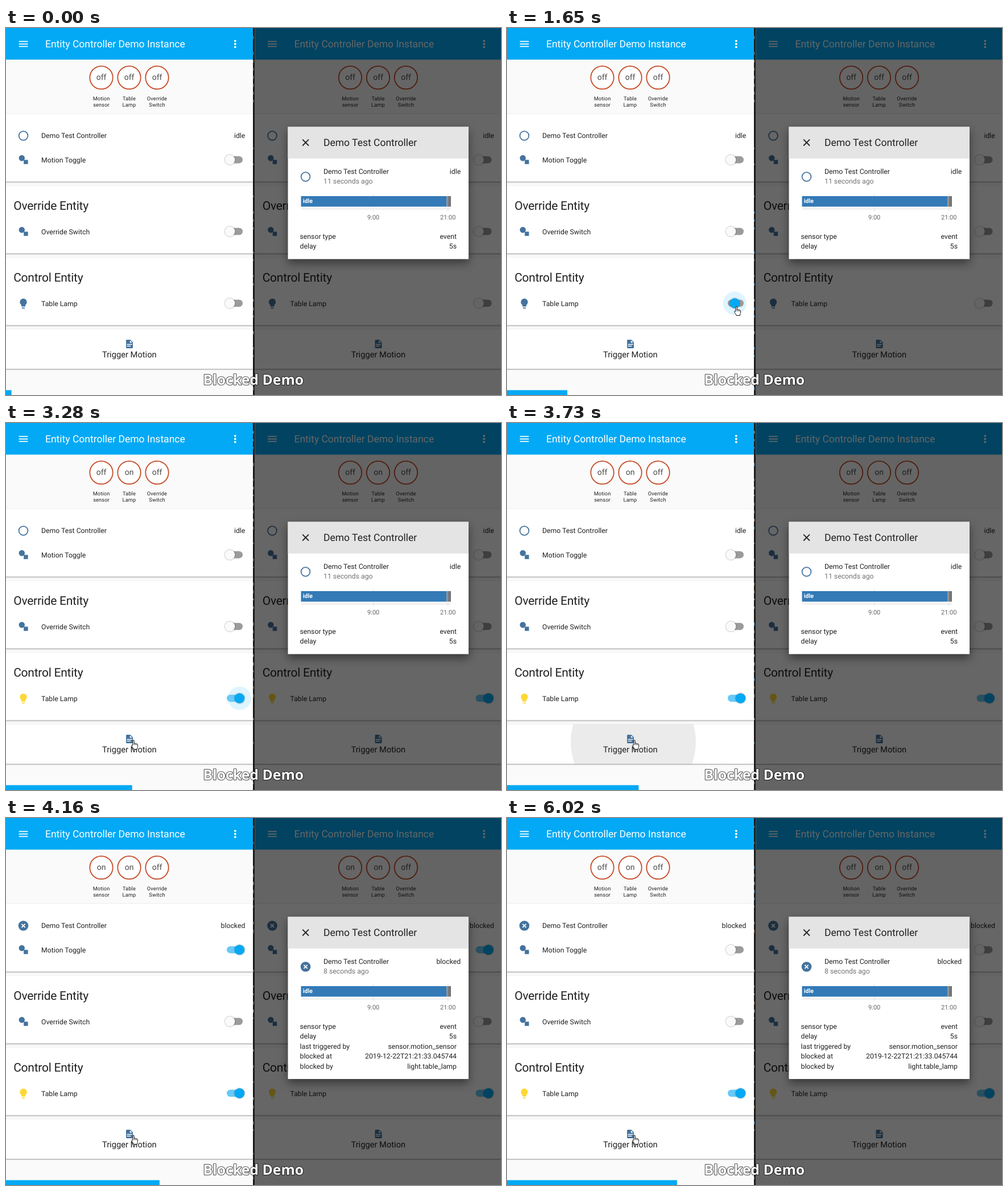
Recreate the animation shown at these times as an HTML page. Size 870 px wide and 644 px high, loop 8000 ms.

```html
<!DOCTYPE html>
<html lang="en">
<head>
<meta charset="utf-8">
<title>Blocked Demo</title>
<style>
  html, body { margin: 0; width: 100%; height: 100%; overflow: hidden; background: #fafafa; }
  svg { display: block; width: 870px; height: 644px; }
  text { font-family: Roboto, sans-serif; text-rendering: geometricPrecision; }
  .card { filter: drop-shadow(0 1.4px 1.1px rgba(0, 0, 0, .42)); }
  .knob { filter: drop-shadow(0 .8px 1px rgba(0, 0, 0, .45)); }
  .dialog { filter: drop-shadow(0 7px 8px rgba(0, 0, 0, .45)); }
  .caption { font: 700 24.8px "Open Sans", "Noto Sans", sans-serif; paint-order: stroke;
    filter: drop-shadow(.6px .8px .6px rgba(0, 0, 0, .4)); }
</style>
</head>
<body>
<svg id="stage" viewBox="0 0 870 644" xmlns="http://www.w3.org/2000/svg"></svg>
<script>
const LOOP = 8000;
const BLUE = '#03a9f4', ICON = '#44739e', INK = '#212121';
const SHIFT = 437.5;
const stage = document.getElementById('stage');

// Bursts of screen updates: first, last, count
const bursts = [[530, 1310, 8], [1530, 2210, 7], [2630, 3280, 7], [3730, 4160, 5], [5780, 6020, 3]];
const ticks = bursts.flatMap(([from, to, count]) =>
  Array.from({ length: count }, (_, i) => Math.round((from + (to - from) * i / (count - 1)) / 10) * 10));

const clamp = v => Math.max(0, Math.min(1, v));
const smooth = v => v * v * (3 - 2 * v);
const mix = (a, b, p) => a + (b - a) * p;
const mixRgb = (a, b, p) => `rgb(${a.map((v, i) => Math.round(mix(v, b[i], p)))})`;

const rect = (x, y, w, h, fill, extra = '') =>
  `<rect x="${x}" y="${y}" width="${w}" height="${h}" fill="${fill}" ${extra}/>`;
const circle = (x, y, r, fill, extra = '') =>
  `<circle cx="${x}" cy="${y}" r="${r}" fill="${fill}" ${extra}/>`;
const text = (x, y, size, str, fill = INK, anchor = 'start', extra = '') =>
  `<text x="${x}" y="${y}" font-size="${size}" fill="${fill}" text-anchor="${anchor}" ${extra}>${str}</text>`;
const icon = (x, y, size, d, fill) =>
  `<path transform="translate(${x - size / 2} ${y - size / 2}) scale(${size / 24})" d="${d}" fill="${fill}"/>`;

const BULB = 'M12 2A7 7 0 0 0 5 9c0 2.38 1.19 4.47 3 5.74V17a1 1 0 0 0 1 1h6a1 1 0 0 0 1-1v-2.26c1.81-1.27 3-3.36 3-5.74a7 7 0 0 0-7-7M9 21a1 1 0 0 0 1 1h4a1 1 0 0 0 1-1v-1H9z';
const FILE = 'M13 9h5.5L13 3.5V9M6 2h8l6 6v12a2 2 0 0 1-2 2H6a2 2 0 0 1-2-2V4c0-1.11.89-2 2-2m9 16v-2H6v2h9m3-4v-2H6v2h12z';
const MENU = 'M3 6h18v2H3zM3 11h18v2H3zM3 16h18v2H3z';
const HAND = 'M2.8 9.6V1.9C2.8.2 5.2.2 5.2 1.9V6.3C5.6 5.4 7.2 5.6 7.4 6.7 8 6 9.4 6.3 9.5 7.3 10.4 6.8 11.5 7.3 11.5 8.5V11.5C11.5 13.2 10.6 14 10.4 16.5H4.2C4 14.4 1.5 12.6.7 10.3.3 8.9 1.9 8.4 2.8 9.6Z';
const ARROW = 'M.5.5V13.7L3.6 10.8 5.7 15.8 7.8 14.9 5.7 10H9.9Z';

function stateIcon(x, y, blocked) {
  if (!blocked) return circle(x, y, 7.9, 'none', `stroke="${ICON}" stroke-width="1.75"`);
  return circle(x, y, 8.8, ICON) +
    `<path d="M${x - 3.1} ${y - 3.1}l6.2 6.2m0-6.2l-6.2 6.2" stroke="#fff" stroke-width="1.8"/>`;
}

const shapes = (x, y) => circle(x - 2.7, y - 2.7, 5.2, ICON) + rect(x + .7, y + .4, 7.4, 7.4, ICON);

function toggle(y, p, ripple = '') {
  const x = mix(393.5, 410.5, p);
  const glow = ripple === 'hover' ? circle(x, y, 20.5, '#f2f2f2')
    : ripple === 'on' ? circle(x, y, 20.5, BLUE, 'opacity=".13"') : '';
  const bar = mixRgb([155, 155, 155], [103, 201, 247], clamp(p * 2 - .8));
  const knob = mixRgb([250, 250, 250], [3, 169, 244], clamp(p * 2.5));
  return glow + rect(388, y - 6.2, 28, 12.4, bar, 'rx="6.2"') + circle(x, y, 8.8, knob, 'class="knob"');
}

const card = (y, bottom, fill = '#fff') => rect(-4, y, 438, bottom - y, fill, 'class="card"');

function badge(x, on, top, bottom) {
  const label = (y, s) => text(x, y, 9.2, s, INK, 'middle', 'letter-spacing=".15"');
  return circle(x, 87, 20.2, '#fff', 'stroke="#c64a26" stroke-width="1.8"') +
    text(x, 91.2, 14, on ? 'on' : 'off', '#4c4c4c', 'middle') + label(127, top) + label(138, bottom);
}

function panel(s) {
  const row = (y, label) => text(62, y + 4.3, 12.25, label);
  const heading = (y, label) => text(13.2, y, 21, label, INK, 'start', 'letter-spacing="-.25"');
  const press = s.press
    ? `<g clip-path="url(#button)">${circle(222, 560, s.press.r, '#000', `opacity="${s.press.a}"`)}</g>` : '';
  return rect(0, 0, 434, 644, '#fafafa') + rect(0, 0, 434, 55.5, BLUE) +
    icon(30.5, 28, 21, MENU, '#fff') +
    text(69, 34.2, 17.5, 'Entity Controller Demo Instance', '#fff') +
    [-1, 0, 1].map(i => circle(402.8, 28 + i * 5.4, 1.9, '#fff')).join('') +
    badge(167.5, s.sensor, 'Motion', 'sensor') +
    badge(216.5, s.lampOn, 'Table', 'Lamp') +
    badge(265.5, false, 'Override', 'Switch') +
    card(150.5, 269.5) + card(277, 395.5) + card(403, 521.5) + card(528.5, 598) + press +
    stateIcon(30.5, 189, s.blocked) + row(189, 'Demo Test Controller') +
    text(420.3, 193.3, 12.25, s.blocked ? 'blocked' : 'idle', INK, 'end') +
    shapes(30.5, 231) + row(231.5, 'Motion Toggle') + toggle(231.2, s.motion) +
    heading(318.8, 'Override Entity') +
    shapes(30.5, 357) + row(357.5, 'Override Switch') + toggle(357, 0) +
    heading(444.8, 'Control Entity') +
    icon(30.5, 483.5, 21, BULB, s.lampOn ? '#fdd835' : ICON) + row(483.3, 'Table Lamp') +
    toggle(483, s.lamp, s.ripple) +
    icon(217, 554.6, 18, FILE, ICON) + text(216.8, 577.6, 14.7, 'Trigger Motion', INK, 'middle');
}

function dialog(blocked) {
  const attrs = [['sensor type', 'event'], ['delay', '5s']];
  if (blocked) attrs.push(['last triggered by', 'sensor.motion_sensor'],
    ['blocked at', '2019-12-22T21:21:33.045744'], ['blocked by', 'light.table_lamp']);
  const height = blocked ? 284.5 : 232;
  const grid = x => rect(x, 291, 1, 31, '#e2e2e2');
  return rect(495.5, 173.5, 317.5, height, '#fff', 'class="dialog"') +
    rect(495.5, 173.5, 317.5, 55.5, '#e4e4e4') +
    `<path d="M521.2 195.7l10.8 10.8m0-10.8l-10.8 10.8" stroke="${INK}" stroke-width="1.8"/>` +
    text(558, 207.2, 17.5, 'Demo Test Controller') +
    stateIcon(526.5, 261, blocked) + text(558, 256, 12.25, 'Demo Test Controller') +
    text(558, 273.3, 12.25, blocked ? '8 seconds ago' : '11 seconds ago', '#727272') +
    text(799.2, 256, 12.25, blocked ? 'blocked' : 'idle', INK, 'end') +
    grid(645.2) + grid(776.3) + rect(518.5, 317, 263.5, 1, '#dcdcdc') +
    rect(518.5, 295, 256, 18.5, '#337ab7') + rect(774.5, 295, 3.2, 18.5, '#8b8b8b') +
    rect(777.7, 295, 1.6, 18.5, '#505a64') + rect(779.3, 295, 2.7, 18.5, '#707070') +
    text(521.8, 307.2, 10.5, 'idle', '#fff', 'start', 'font-weight="700"') +
    text(645.7, 336, 11, '9:00', '#666', 'middle') + text(776.8, 336, 11, '21:00', '#666', 'middle') +
    attrs.map(([name, value], i) => text(516.5, 370 + i * 17.4, 12.25, name) +
      text(792, 370 + i * 17.4, 12.25, value, INK, 'end')).join('');
}

// Sliver of a log window showing between the two panels
function sliver(seed) {
  const random = () => (seed = seed * 16807 % 2147483647) / 2147483647;
  const tints = ['#8a8a8a', '#4b7796', '#74604c', '#666'];
  let out = rect(434, 0, 3, 644, '#1b1b1b');
  for (let y = 14; y < 640; y += 14) {
    const show = random() < .55, h = 2 + random() * 4;
    const tint = tints[Math.floor(random() * tints.length)];
    if (show) out += rect(434, y, 1.5, h, tint);
  }
  return out;
}

function pointer(n) {
  if (n < 1) return '';
  let x, y, hand;
  if (n < 16) {
    const p = 1 - (1 - clamp((n - 1) / 5)) ** 1.6;
    x = mix(729, 401, p);
    y = mix(626, 491, p);
    if (n > 6) { x = n > 7 ? 399 : 400; y = n > 7 ? 488 : 489.5; }
    hand = x < 412;
  } else {
    const p = smooth(clamp((n - 15) / 7));
    x = mix(399, 220, p);
    y = mix(488, 556, p);
    hand = x > 382 || y > 526;
  }
  return `<path transform="translate(${x} ${y})" d="${hand ? HAND : ARROW}" fill="#fff" stroke="#111" stroke-width="1" stroke-linejoin="round"/>` +
    (hand ? `<path transform="translate(${x} ${y})" d="M5.2 6v3M7.4 6.8v2.4M9.5 7.4v2" stroke="#111" stroke-width=".8"/>` : '');
}

function slide(n, on, off = Infinity) {
  if (n < on || n > off) return 0;
  return n === on || n === off ? .4 : 1;
}

function draw(n) {
  const press = { 23: { r: 110, a: .08 }, 24: { r: 270, a: .12 }, 25: { r: 270, a: .122 }, 26: { r: 270, a: .05 } }[n];
  const left = {
    sensor: n >= 24 && n < 28, lampOn: n >= 12, blocked: n >= 24,
    motion: slide(n, 24, 28), lamp: slide(n, 10), press,
    ripple: n < 6 || n > 22 ? '' : n < 10 ? 'hover' : 'on'
  };
  const right = {
    sensor: n >= 25 && n < 28, lampOn: n >= 12, blocked: n >= 25,
    motion: slide(n, 25, 28), lamp: slide(n, 12)
  };
  stage.innerHTML =
    `<defs><clipPath id="half"><rect width="434" height="644"/></clipPath>
     <clipPath id="button"><rect y="528.5" width="434" height="69.5"/></clipPath></defs>` +
    `<g clip-path="url(#half)">${panel(left)}</g>` +
    `<g transform="translate(${SHIFT} 0)"><g clip-path="url(#half)">${panel(right)}</g></g>` +
    rect(437, 0, 433, 644, '#000', 'opacity=".6"') +
    sliver(n < 12 ? 4127 : n < 25 ? 9341 : 7703) + dialog(right.blocked) +
    rect(0, 635.5, (n + 1) * 9.64, 8.5, BLUE) +
    '<text class="caption" x="434.8" y="626.3" text-anchor="middle" fill="#fff" stroke="#000" stroke-opacity=".58" stroke-width="2" stroke-linejoin="round">Blocked Demo</text>' +
    pointer(n);
}

let shown = -1;
function frame(now) {
  const t = now % LOOP;
  const n = ticks.filter(at => at <= t).length;
  if (n !== shown) draw(shown = n);
  requestAnimationFrame(frame);
}
draw(shown = 0);
requestAnimationFrame(frame);
</script>
</body>
</html>
```
